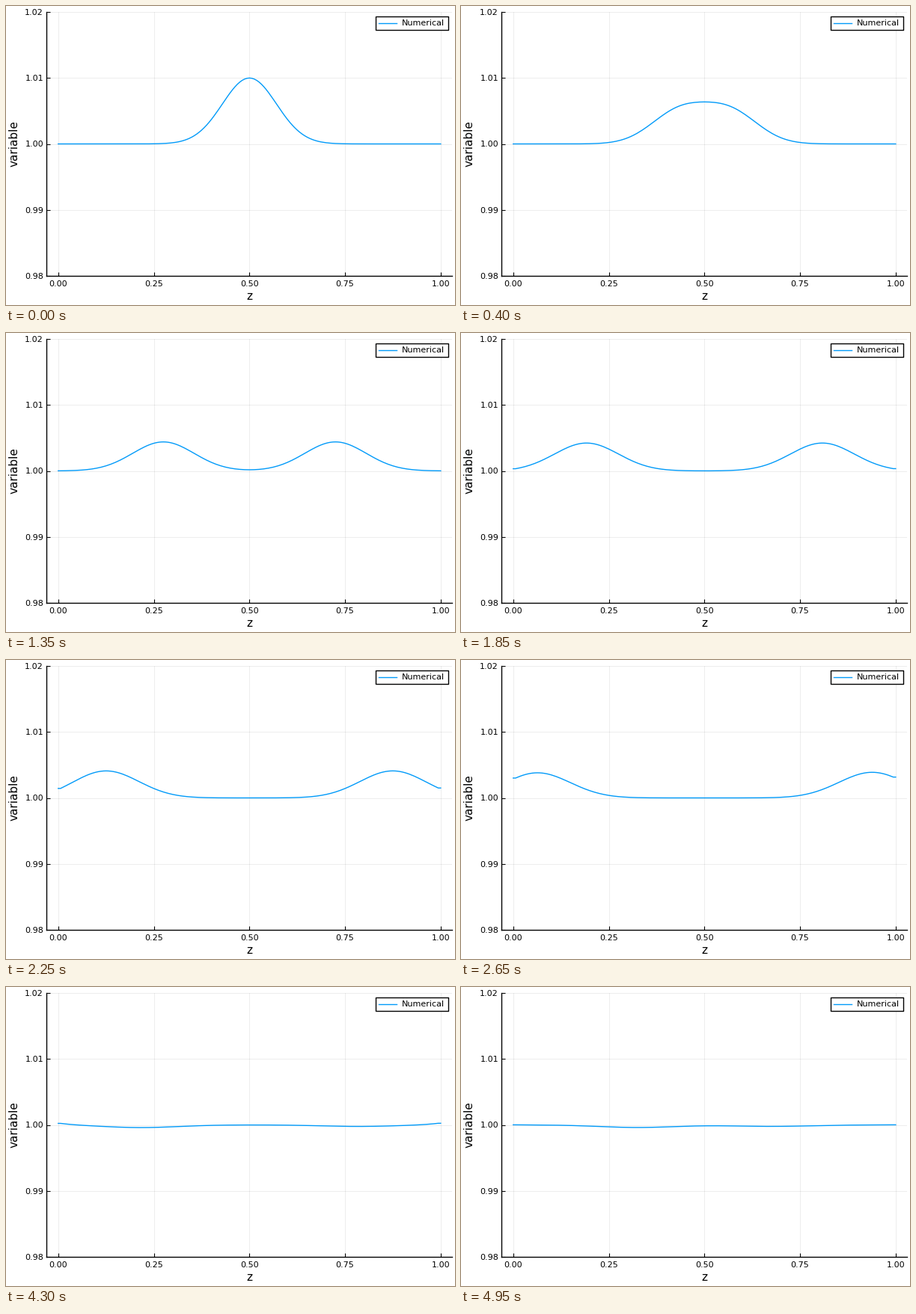
A matplotlib script that plays this animation: 600 by 400 pixels, repeating every 5000 ms.

```python
import matplotlib.pyplot as plt
import numpy as np
from matplotlib.animation import FuncAnimation
from matplotlib.patches import Rectangle

W, H, DPI = 600, 400, 100
FRAMES, INTERVAL = 100, 50
LEFT, RIGHT, TOP, BOTTOM = 54.4, 596.2, 8.2, 360.8

SPEED = 1 / 120                # distance travelled per step
SPREAD = 5.37e-5               # variance gained per step
VAR0 = 0.005
ECHO_LEFT, ECHO_RIGHT = -0.112, -0.064

plt.rcParams["font.family"] = "DejaVu Sans"
fig = plt.figure(figsize=(W / DPI, H / DPI), dpi=DPI, facecolor="white")

ax = fig.add_axes([LEFT / W, 1 - BOTTOM / H,
                   (RIGHT - LEFT) / W, (BOTTOM - TOP) / H])
ax.set(xlim=(-0.03, 1.03), ylim=(0.98, 1.02))
ax.set_xticks(np.linspace(0, 1, 5))
ax.set_yticks(np.linspace(0.98, 1.02, 5))
ax.tick_params(direction="in", length=3.4, width=0.8,
               labelbottom=False, labelleft=False)
ax.grid(color="black", alpha=0.1, linewidth=0.5)
ax.set_axisbelow(True)
for side in ("top", "right"):
    ax.spines[side].set_visible(False)
for side in ("left", "bottom"):
    ax.spines[side].set_linewidth(1)

# Overlay in pixel units for labels and legend.
page = fig.add_axes([0, 0, 1, 1])
page.set(xlim=(0, W), ylim=(H, 0))
page.axis("off")


def label(x, y, text, size=8, **kw):
    page.text(x, y, text, fontsize=size, va="baseline", **kw)


for t in ax.get_xticks():
    x = LEFT + (t + 0.03) / 1.06 * (RIGHT - LEFT)
    label(x, 374.6, f"{t:.2f}", ha="center")
for t in ax.get_yticks():
    y = BOTTOM - (t - 0.98) / 0.04 * (BOTTOM - TOP)
    label(50, y + 4, f"{t:.2f}", ha="right")
label(325.3, 393, "z", 11, ha="center")
label(15.6, 184.4, "variable", 11, ha="center",
      rotation=90, rotation_mode="anchor")

page.add_patch(Rectangle((494.3, 13.5), 97, 18.5, facecolor="white",
                         edgecolor="black", linewidth=1, joinstyle="round"))
page.plot([498, 522], [22.5, 22.5], color="#009AF9", linewidth=1)
label(528.5, 26.5, "Numerical")

z = np.linspace(0, 1, 161)
inner = np.clip(z, z[1], z[-2])    # end cells copy their neighbours
curve, = ax.plot(z, np.ones_like(z), color="#009AF9", linewidth=1)


def wave(step):
    """Two spreading pulses plus their weak echoes from the ends."""
    var = VAR0 + SPREAD * step
    amp = 0.005 * np.sqrt(VAR0 / var)
    shift = SPEED * step

    def pulse(center):
        return amp * np.exp(-(inner - center) ** 2 / (2 * var))

    return (1 + pulse(0.5 - shift) + pulse(0.5 + shift)
            + ECHO_LEFT * pulse(shift - 0.5)
            + ECHO_RIGHT * pulse(1.5 - shift))


def update(step):
    curve.set_ydata(wave(step))
    return curve,


anim = FuncAnimation(fig, update, frames=FRAMES, interval=INTERVAL,
                     repeat=True, repeat_delay=0)
plt.show()
```
